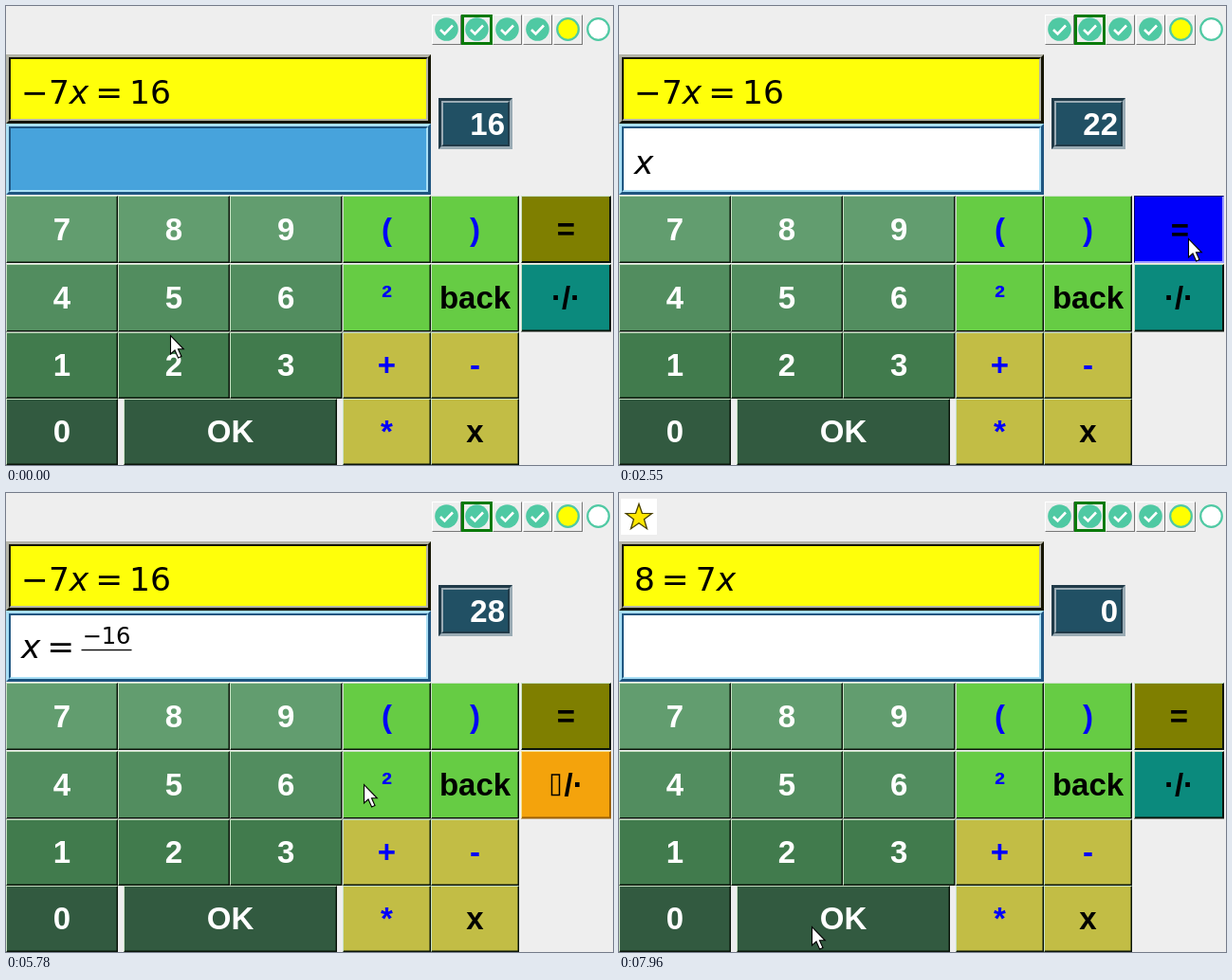
These frames come from a looping animation (640 by 484 pixels, 7990 ms). An HTML page:

```html
<!DOCTYPE html>
<html lang="en">
<head>
<meta charset="utf-8">
<title>Equation trainer</title>
<style>
  html, body { margin: 0; width: 640px; height: 484px; overflow: hidden; background: #eee; }
  svg { display: block; }
  .key, .clock { font: bold 33px "Liberation Sans", Arial, sans-serif; }
  .key { text-anchor: middle; }
  .key .start { text-anchor: start; }
  .clock { text-anchor: end; fill: #fff; }
  .math { font: 34.5px "DejaVu Sans", sans-serif; }
  .small { font-size: 24.15px; }
  .math tspan.v { font-style: oblique; }
</style>
</head>
<body>
<svg id="stage" width="640" height="484" viewBox="0 0 640 484"></svg>
<script>
const LOOP = 7990;
const stage = document.getElementById('stage');

const rect = (x, y, w, h, fill, extra = '') =>
  `<rect x="${x}" y="${y}" width="${w}" height="${h}" fill="${fill}" ${extra}/>`;

// Rectangle whose top-left and bottom-right edges have different colours
function bevel(x, y, w, h, b, topLeft, bottomRight) {
  const r = x + w, d = y + h;
  return rect(x, y, w, h, bottomRight) +
    `<path fill="${topLeft}" d="M${x} ${d}V${y}H${r}l${-b} ${b}H${x + b}V${d - b}z"/>`;
}

function ridge(x, y, w, h, outer, inner, light, dark, fill, id) {
  const b = outer + inner;
  return bevel(x, y, w, h, outer, light, dark) +
    bevel(x + outer, y + outer, w - 2 * outer, h - 2 * outer, inner, dark, light) +
    rect(x + b, y + b, w - 2 * b, h - 2 * b, fill, id ? `id="${id}"` : '');
}

// Progress icons
const MINT = '#4fc9a3';
function progress() {
  let s = '';
  for (let i = 0; i < 6; i++) {
    const x = 449 + i * 32, cx = x + 15.5;
    if (i === 1) s += rect(x - 1, 9, 33, 32, '#0a7a0a') + rect(x + 2, 12, 27, 26, '#eee');
    else if (i < 5) s += bevel(x, 9, 31, 32, 1, '#fff', '#777') + rect(x + 1, 10, 29, 30, '#eee');
    if (i < 4) {
      s += `<circle cx="${cx}" cy="24.5" r="12.3" fill="${MINT}"/>
        <path d="M${cx - 6.5} 25l4.5 4.5l8.5-9" fill="none" stroke="#fff" stroke-width="2.6"/>`;
    } else {
      s += `<circle cx="${cx}" cy="24.5" r="11.3" fill="${i === 4 ? '#ff0' : '#fff'}" stroke="${MINT}" stroke-width="2.2"/>`;
    }
  }
  return s;
}

function star() {
  let pts = '';
  for (let i = 0; i < 10; i++) {
    const a = i * Math.PI / 5, r = i % 2 ? 5.8 : 14.5;
    pts += `${(21 + r * Math.sin(a)).toFixed(1)},${(26 - r * Math.cos(a)).toFixed(1)} `;
  }
  return `<g id="star">${rect(2, 6, 38, 38, '#fff')}
    <polygon points="${pts}" fill="#ffe800" stroke="#4a4200" stroke-width="1.3"/></g>`;
}

// Keypad
const COLS = [[0, 118], [118, 118], [236, 118.5], [355, 93], [448, 93], [543, 95]];
const ROWS = [[200, 71], [272, 71.5], [344, 70], [414, 70]];
const GREENS = ['#629d6f', '#528d5f', '#417b4d', '#325a40'];
const BLUE = '#0000fa', LIME = '#66cc44', SAND = '#c2bd45';
const keys = {};

function key(label, col, row, fill, ink, box) {
  const [x, w] = box || COLS[col], [y, h] = ROWS[row];
  keys[label] = { x, y, w, h, fill, ink, cx: x + w / 2, base: [247, 319, 390, 460][row] };
}
['789', '456', '123', '0'].forEach((line, r) =>
  [...line].forEach((c, i) => key(c, i, r, GREENS[r], '#fff')));
key('OK', 0, 3, GREENS[3], '#fff', [124, 225]);
key('(', 3, 0, LIME, BLUE);
key(')', 4, 0, LIME, BLUE);
key('²', 3, 1, LIME, BLUE);
key('back', 4, 1, LIME, '#000');
key('+', 3, 2, SAND, BLUE);
key('-', 4, 2, SAND, BLUE);
key('*', 3, 3, SAND, BLUE);
key('x', 4, 3, SAND, '#000');
key('=', 5, 0, '#7f7f00', '#000');
key('·/·', 5, 1, '#0b8a7d', '#000');

const slot = x => rect(x, 297, 8, 21.5, 'none', 'stroke="#000" stroke-width="1.5"');
const FRACTION = [
  null,
  { fill: '#f4a30c', light: '#f7e08a', dark: '#9c5f00', face: slot(575.5) + '<text class="start" x="588.5" y="319">/·</text>' },
  { fill: '#0b8f0b', light: '#064f06', dark: '#7fd0a0', face: '<text class="start" x="571" y="319">·/</text>' + slot(596.5) }
];

function drawKey(label, pressed, mode = 0) {
  const k = keys[label], m = FRACTION[mode];
  const b = k.x === 543 ? 2 : 1.5;
  const fill = pressed ? BLUE : m ? m.fill : k.fill;
  const light = pressed ? '#00006a' : m ? m.light : 'rgb(200,225,195)';
  const dark = pressed ? '#9a9aff' : m ? m.dark : '#0a140a';
  const shift = pressed ? 1 : 0;
  const face = m ? m.face : `<text x="${k.cx}" y="${k.base}">${label}</text>`;
  return bevel(k.x, k.y, k.w, k.h, 1, light, dark) +
    rect(k.x + 1, k.y + 1, k.w - 1 - b, k.h - 1 - b, fill) +
    `<g fill="${k.ink}" transform="translate(${shift} ${shift})">${face}</g>`;
}

// Formulas
const X = '<tspan class="v">x</tspan>';
const EQ = '<tspan dx="6.9">=</tspan>';
const formula = (s, y) => `<text x="16" y="${y}">${s}</text>`;

function fraction(top, bottom, base, width) {
  const bar = base - 8.5, mid = 79.5 + width / 2;
  const part = (s, y) => `<text class="small" text-anchor="middle" x="${mid}" y="${y}">${s}</text>`;
  return formula(X + EQ, base) + rect(79.5, bar - .6, width, 1.3, '#000') +
    part(top, bar - 6.5) + part(bottom, bar + 22.5);
}

const TASKS = [[0, formula('−7' + X + EQ + '<tspan dx="6.9">16</tspan>', 103)],
  [7570, formula('8' + EQ + `<tspan dx="6.9">7</tspan>` + X, 103)]];

const ANSWERS = [
  [0, ''],
  [1890, formula(X, 177)],
  [2760, formula(X + EQ, 177)],
  [3400, fraction('', '', 177, 10.5)],
  [4800, fraction('−', '', 175.5, 22.5)],
  [5340, fraction('−1', '', 174, 38)],
  [5760, fraction('−16', '', 174, 53)],
  [6410, fraction('−16', '7', 166.5, 53)],
  [7570, '']
];

const MODES = [[0, 0], [3400, 1], [6060, 2], [7570, 0]];

const CLOCK = [[0, 16], [400, 17], [820, 18], [1240, 19], [1660, 20], [2080, 21],
  [2500, 22], [2930, 23], [3370, 24], [3960, 25], [4400, 26], [4830, 27],
  [5350, 28], [5890, 29], [6440, 30], [7280, 31], [7570, 0]];

const PRESSES = [['x', 1680, 1830], ['=', 2490, 2640], ['·/·', 3210, 3400], ['-', 4320, 4460],
  ['1', 5120, 5240], ['6', 5600, 5700], ['·/·', 5950, 6060], ['7', 6290, 6390], ['OK', 6940, 7050]];

// Pointer stops: time, x, y
const PATH = [[0, 173, 347], [820, 177, 352], [1250, 490, 443], [1860, 492, 445],
  [2430, 601, 243], [2640, 600, 247], [3150, 584, 312], [3710, 582, 317], [3960, 582, 317],
  [4290, 494, 390], [4500, 490, 394], [4740, 346, 386], [4960, 145, 369], [5100, 62, 380],
  [5260, 62, 380], [5580, 300, 306], [5700, 302, 306], [5940, 585, 308], [6070, 583, 308],
  [6280, 45, 244], [6440, 42, 248], [6600, 42, 248], [6780, 200, 423], [6900, 204, 456], [7990, 203, 457]];

const at = (list, t) => list.findLast(e => e[0] <= t)[1];

function pointer(t) {
  const i = PATH.findLastIndex(p => p[0] <= t);
  const [t0, x0, y0] = PATH[i], [t1, x1, y1] = PATH[i + 1];
  const u = (t - t0) / (t1 - t0), e = u * u * (3 - 2 * u);
  return [x0 + (x1 - x0) * e, y0 + (y1 - y0) * e].map(Math.round);
}

stage.innerHTML = rect(0, 0, 640, 484, '#eee') + progress() + star() +
  ridge(0, 51, 448, 73, 3, 2, '#b4b4a8', '#141400', '#ffff0a') +
  ridge(0, 124, 448, 75, 3, 2, '#a9dff5', '#1f5580', '#fff', 'panel') +
  ridge(456, 97, 78, 54, 3, 2, '#203a48', '#9aabb4', '#215064') +
  '<g class="math" id="task"></g><g class="math" id="answer"></g>' +
  '<text class="clock" id="clock" x="526" y="136"></text>' +
  Object.keys(keys).map((k, i) => `<g class="key" id="key${i}"></g>`).join('') +
  `<path id="pointer" d="M.5 .5V20L5 16L8.6 24L12 22.5L8.5 14.8H14.3Z"
    fill="#fff" stroke="#000" stroke-width="1.1"/>`;

const el = id => document.getElementById(id);
const shown = {};
function put(id, html) {
  if (shown[id] !== html) el(id).innerHTML = shown[id] = html;
}

function draw(t) {
  put('task', at(TASKS, t));
  put('answer', at(ANSWERS, t));
  put('clock', String(at(CLOCK, t)));
  el('panel').setAttribute('fill', t < 1890 ? '#47a3dc' : '#fff');
  el('star').style.display = t < 7050 ? 'none' : '';
  Object.keys(keys).forEach((k, i) => {
    const pressed = PRESSES.some(([name, from, to]) => name === k && t >= from && t < to);
    put('key' + i, drawKey(k, pressed, k === '·/·' ? at(MODES, t) : 0));
  });
  el('pointer').setAttribute('transform', `translate(${pointer(t)})`);
}

const start = performance.now();
function tick(now) {
  draw(Math.max(0, now - start) % LOOP);
  requestAnimationFrame(tick);
}
draw(0);
requestAnimationFrame(tick);
</script>
</body>
</html>
```
